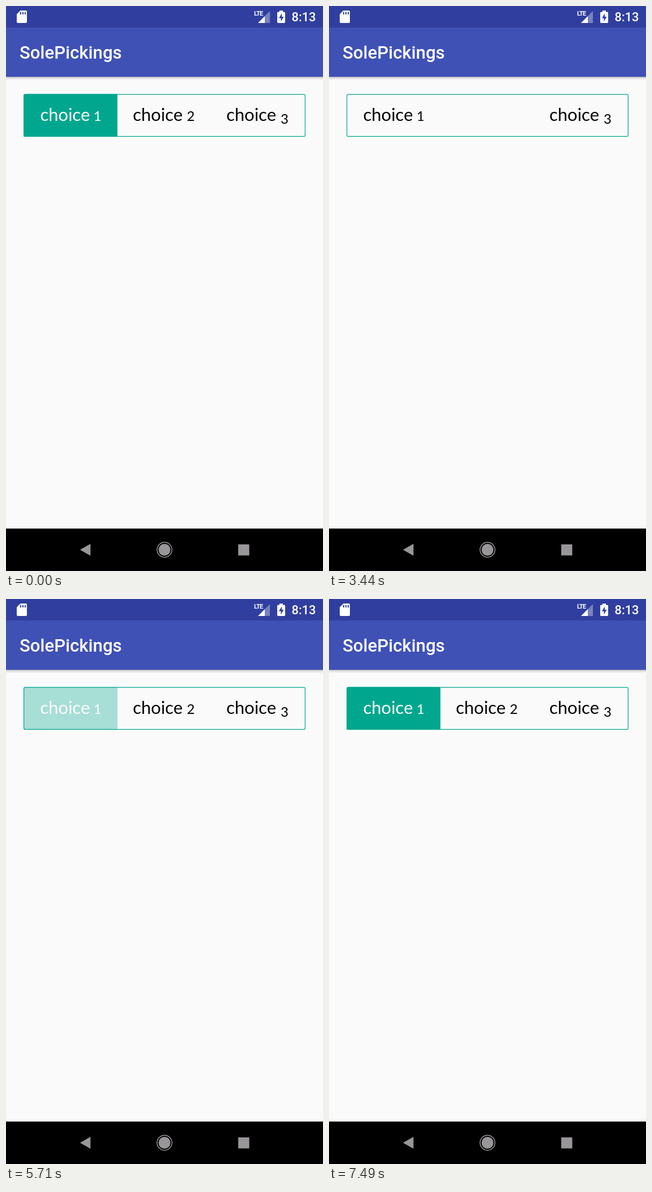
Write an HTML page that moves like this. It is 561 px wide and 998 px high and loops after 8 s.

```html
<!DOCTYPE html>
<html lang="en">
<head>
<meta charset="utf-8">
<title>Segmented choice</title>
<style>
  html, body { margin: 0; width: 100%; height: 100%; overflow: hidden; background: #fafafa; }
  svg { display: block; width: 100%; height: 100%; }
  text { font-family: Roboto, sans-serif; font-weight: 500; fill: #fff; }
  .label { font: 31px Lato, sans-serif; }
  .digit { font-size: 24px; }
  .dark text { fill: #000; }
</style>
</head>
<body>
<svg viewBox="0 0 561 998">
  <defs>
    <linearGradient id="shadow" x2="0" y2="1">
      <stop offset="0" stop-color="#000" stop-opacity=".3"/>
      <stop offset=".4" stop-color="#000" stop-opacity=".1"/>
      <stop offset="1" stop-color="#000" stop-opacity="0"/>
    </linearGradient>
  </defs>
  <rect width="561" height="998" fill="#fafafa"/>

  <!-- status bar and toolbar -->
  <rect y="125" width="561" height="6" fill="url(#shadow)"/>
  <rect width="561" height="125" fill="#3f51b5"/>
  <rect width="561" height="38" fill="#303f9f"/>
  <path d="M25.500 8H35q2 0 2 2V28q0 2-2 2H21q-2 0-2-2V14.500z" fill="#fff"/>
  <path d="M26 10.500v4.500M30 10.500v4.500M34 10.500v4.500" stroke="#303f9f" stroke-width="2"/>
  <text x="439" y="17" font-size="11" style="font-weight:700;font-stretch:75%;letter-spacing:-.8px">LTE</text>
  <path d="M446 30L467 9V30z" fill="#fff" opacity=".35"/>
  <path d="M446 30L458 18V30z" fill="#fff"/>
  <path d="M484 8h6v2.500h2.500q1.500 0 1.500 1.500V28.500q0 1.500-1.500 1.500h-11q-1.500 0-1.500-1.500V12q0-1.500 1.500-1.500H484z" fill="#fff"/>
  <path d="M488 13L483 21.500h3.500V27.500L491.500 19H488z" fill="#303f9f"/>
  <text x="505.500" y="27" font-size="21.800">8:13</text>
  <text x="24" y="93" font-size="31.200">SolePickings</text>

  <g id="choices"></g>
  <rect x="31.600" y="156.100" width="497.800" height="74.300" rx="2.500" fill="none" stroke="#00a78e" stroke-width="1.200"/>

  <!-- navigation bar -->
  <rect y="923" width="561" height="75"/>
  <g fill="#999699">
    <path d="M131 960.500L149.500 950V971z"/>
    <circle cx="280.500" cy="960.500" r="10.500"/>
    <circle cx="280.500" cy="960.500" r="13.200" fill="none" stroke="#999699" stroke-width="1.500"/>
    <rect x="411" y="951" width="19.500" height="19.500"/>
  </g>
</svg>
<script>
const LOOP = 8000, FADE = 235;
// [time, selected choice]
const switches = [[3440, 1], [4200, 2], [5620, 0], [6190, 1], [7210, 0]];
const labelX = [60.5, 224.5, 390], digitX = [155, 320, 486];
const choices = document.getElementById("choices");

// Old-style numerals: small digits, with the 3 hanging below the baseline.
const label = i => `<text class="label" x="${labelX[i]}" y="203">choice <tspan
  class="digit" x="${digitX[i]}" y="${i === 2 ? 208 : 203}">${i + 1}</tspan></text>`;

choices.innerHTML = [0, 1, 2].map(i => `
  <g class="dark">${label(i)}</g>
  <g class="on"><rect x="${31 + 166.2 * i}" y="155.500" width="166.200" height="75.500" rx="2.500" fill="#00a78e"/>${label(i)}</g>`).join("");
const dark = choices.querySelectorAll(".dark"), on = choices.querySelectorAll(".on");

function draw(now) {
  const t = now % LOOP;
  const [start, selected] = switches.filter(s => s[0] <= t).pop() || [-FADE, 0];
  const p = Math.min(1, (t - start) / FADE);
  const alpha = (1 - Math.cos(Math.PI * p)) / 2;
  for (let i = 0; i < 3; i++) {
    dark[i].style.opacity = i === selected ? 0 : 1;
    on[i].style.opacity = i === selected ? alpha : 0;
  }
}

function tick() {
  draw(performance.now());
  requestAnimationFrame(tick);
}
tick();
</script>
</body>
</html>
```
